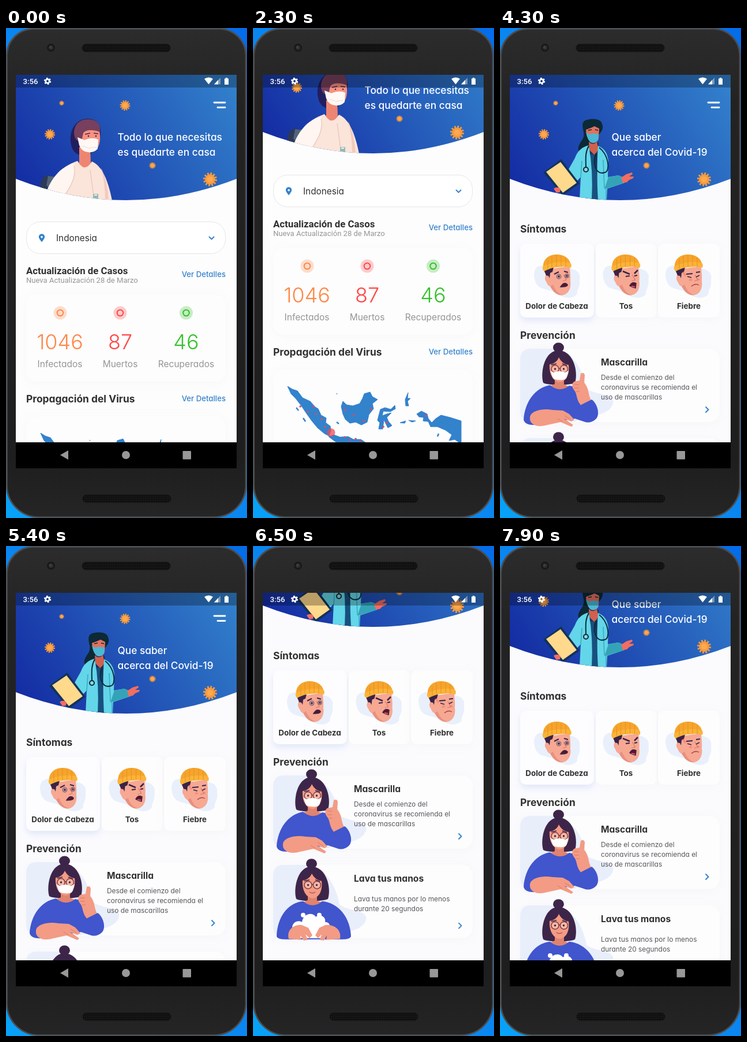
Write an HTML page that moves like this. It is 418 px wide and 848 px high and loops after 8000 ms.

```html
<!DOCTYPE html>
<html lang="es">
<head>
<meta charset="utf-8">
<title>App de salud</title>
<style>
html, body { margin: 0; width: 100%; height: 100%; overflow: hidden; background: #0a7cf0; }
svg { display: block; }
text { font-family: Inter, "Open Sans", sans-serif; font-feature-settings: "cv11"; fill: #303030; }
.rob, .rob text { font-family: Roboto, sans-serif; }
.lead { font-size: 17.3px; font-weight: 500; fill: #fff; }
.h { font-size: 17.4px; font-weight: 700; }
.link { font-size: 13.2px; font-weight: 500; fill: #3382cc; text-anchor: end; }
.num { font-size: 36px; font-weight: 300; text-anchor: middle; }
.cap { font-size: 15.5px; fill: #959595; text-anchor: middle; }
.sym { font-size: 13.4px; font-weight: 700; text-anchor: middle; }
.item { font-size: 15.6px; font-weight: 700; }
.body { font-size: 11.9px; fill: #58585c; }
.card { fill: #fdfdfe; filter: drop-shadow(0 2px 8px rgba(150, 150, 160, .06)); }
.active { fill: #fdfdff; filter: drop-shadow(0 6px 6px rgba(64, 110, 210, .13)); }
.chev { fill: none; stroke: #3382cc; stroke-width: 1.9; stroke-linecap: round; stroke-linejoin: round; }

.scroll1 { animation: scroll1 8s infinite step-end; }
.scroll2 { animation: scroll2 8s infinite step-end; }
.page2 { animation: enter 8s infinite step-end; }

@keyframes scroll1 {
  0% { transform: translateY(0); }
  15% { transform: translateY(0); animation-timing-function: steps(7, start); }
  23.75% { transform: translateY(-121px); }
  26.25% { transform: translateY(-121px); animation-timing-function: steps(3, start); }
  30% { transform: translateY(-81px); animation-timing-function: steps(5, start); }
  36.25%, 100% { transform: translateY(0); }
}
@keyframes enter {
  0% { opacity: 0; transform: translateY(0); }
  50% { opacity: .06; transform: translateY(148px); }
  51.25% { opacity: .34; transform: translateY(34px); }
  52.5% { opacity: .8; transform: translateY(3px); }
  53.75%, 100% { opacity: 1; transform: translateY(0); }
}
@keyframes scroll2 {
  0% { transform: translateY(0); }
  67.5% { transform: translateY(-8px); }
  68.75% { transform: translateY(-8px); animation-timing-function: steps(5, start); }
  75% { transform: translateY(-82px); animation-timing-function: steps(6, start); }
  82.5% { transform: translateY(-158px); animation-timing-function: steps(3, start); }
  86.25% { transform: translateY(-179px); }
  95% { transform: translateY(-179px); animation-timing-function: steps(4, start); }
  100% { transform: translateY(-88px); }
}
</style>
</head>
<body>
<svg width="100%" height="100%" viewBox="0 0 418 848">
<defs>
  <linearGradient id="desk" x1="0" y1="1" x2="1" y2="0"><stop stop-color="#08a2f8"/><stop offset=".5" stop-color="#0a86f0"/><stop offset="1" stop-color="#046cea"/></linearGradient>
  <linearGradient id="shell" x2="0" y2="1"><stop stop-color="#2d2c2c"/><stop offset=".15" stop-color="#232323"/><stop offset=".88" stop-color="#1e1e1e"/><stop offset="1" stop-color="#252525"/></linearGradient>
  <linearGradient id="sky" gradientUnits="userSpaceOnUse" x1="400" y1="81" x2="17" y2="334"><stop stop-color="#3383cd"/><stop offset="1" stop-color="#11249f"/></linearGradient>
  <pattern id="mesh" width="3" height="3" patternUnits="userSpaceOnUse"><rect width="3" height="3" fill="#0d0d0d"/><circle cx="1.5" cy="1.5" r=".8" fill="#2c2c2c"/></pattern>
  <clipPath id="curve"><path d="M17 81H400V261Q208.5 335 17 261Z"/></clipPath>

  <g id="virus">
    <circle r="7.4" fill="#f79a3e"/>
    <circle r="8" fill="none" stroke="#f79a3e" stroke-width="4" stroke-dasharray="2.2 1.99"/>
    <circle r="4.4" fill="#ffa94f"/>
  </g>
  <g id="hero">
    <path d="M17 81H400V261Q208.5 335 17 261Z" fill="url(#sky)"/>
    <use href="#virus" transform="translate(96.5 130) scale(.42)"/>
    <use href="#virus" transform="translate(206.5 134) scale(.9)"/>
    <use href="#virus" transform="translate(76 184) scale(.9)"/>
    <use href="#virus" transform="translate(254 238) scale(.56)"/>
    <use href="#virus" transform="translate(354 262) scale(1.2)"/>
    <path d="M361 129H380M367 137.5H380" stroke="#fff" stroke-width="2.8" stroke-linecap="round"/>
  </g>

  <g id="count">
    <circle r="11.5" opacity=".27" stroke="none" fill="currentColor"/>
    <circle r="5.3" fill="none" stroke="currentColor" stroke-width="2"/>
  </g>

  <g id="head">
    <path d="M64 406C78 398 90 406 104 410C124 404 142 412 138 428C140 440 132 446 134 452C124 464 108 458 98 452C88 444 78 446 68 440C58 432 56 412 64 406Z" fill="#e9f0fb"/>
    <path d="M80 410L121 404C121 412 123 420 122 430C124 442 119 452 110 454C99 456 92 448 87 439C80 438 77 422 80 410Z" fill="#f6a892"/>
    <path d="M87 439C92 448 99 456 110 454C101 453 95 444 92 436Z" fill="#e9907e"/>
    <path d="M76 411L93 406L91 414L87 416L86 425L81 422Z" fill="#3a2346"/>
    <path d="M84 421C77 418 76 427 81 432C84 434 87 431 86 425Z" fill="#f6a892"/>
    <path d="M75 408C73 391 86 384 98 384C112 384 122 391 123 404Z" fill="#f6a42c"/>
    <path d="M74 405C89 397 108 395 122 399Q125 401 123 407C108 403 92 405 77 413Q73 411 74 405Z" fill="#fbb338"/>
    <path d="M83 392V409M90 387V406M98 385V405M106 386V404M114 389V405" stroke="#e3921f" stroke-width="1"/>
    <path d="M110 419L115 428L109 430" fill="none" stroke="#e0776c" stroke-width="1.3"/>
  </g>

  <g id="face">
    <path d="M35 566Q35 547 54 547H100C130 556 146 590 150 616C166 628 200 624 196 642C190 664 150 664 130 673H54Q35 673 35 654Z" fill="#e9eefb"/>
    <ellipse cx="101.500" cy="545" rx="9.500" ry="8.500" fill="#3d2549"/>
    <path d="M75 606C70 592 75 551 101 550C128 550 136 588 130 606C120 611 84 611 75 606Z" fill="#3d2549"/>
    <path d="M95 595H111V609L119 612Q104 625 88 611L95 608Z" fill="#e0836f"/>
    <path d="M86 574C93 574 100 568 102 562C106 570 112 574 119 575C121 590 116 604 103 605C91 603 85 590 86 574Z" fill="#f39b84"/>
    <path d="M89 575L98 573M108 573L116 576" stroke="#3d2549" stroke-width="1.6"/>
    <path d="M89 582a6.500 6.500 0 1 0 13 0a6.500 6.500 0 1 0-13 0M104.500 582a6.500 6.500 0 1 0 13 0a6.500 6.500 0 1 0-13 0M101 581h4" fill="#f6b8a4" stroke="#7b3b45" stroke-width="1.4"/>
    <circle cx="95.500" cy="582" r="1.700" fill="#3d2549"/><circle cx="110.500" cy="582" r="1.700" fill="#3d2549"/>
  </g>
</defs>

<rect width="418" height="848" fill="url(#desk)"/>
<path d="M1.5 47A46 46 0 0 1 47 1.5H371A46 46 0 0 1 416 47V792A55 55 0 0 1 361 846.500H56A55 55 0 0 1 1.500 792Z" fill="url(#shell)" stroke="#504b48" stroke-width="2.600"/>
<circle cx="78" cy="34" r="7" fill="#191919"/><circle cx="78" cy="34" r="3.8" fill="#303036"/><circle cx="77" cy="33" r="1.5" fill="#45454d"/>
<rect x="132" y="28" width="153" height="13" rx="6.5" fill="url(#mesh)" stroke="#111"/>
<rect x="133" y="808" width="153" height="13" rx="6.5" fill="url(#mesh)" stroke="#111"/>
<rect x="17" y="81" width="383" height="681"/>
<g fill="#989898">
  <path d="M94 739L108 731V747Z"/><circle cx="208" cy="739" r="7"/><rect x="306.5" y="732" width="14.5" height="14.5" rx="1"/>
</g>

<svg x="17" y="81" width="383" height="636" viewBox="17 81 383 636">
  <rect x="17" y="81" width="383" height="636" fill="#fdfdfd"/>
  <g class="scroll1">
    <use href="#hero"/>
    <g clip-path="url(#curve)">
      <path d="M61 298C57 272 60 257 72 255L96 260V298Z" fill="#2c3a57"/>
      <path d="M73 256L88 258L80 285L70 272Z" fill="#52647a"/>
      <path d="M113 202C108 181 119 157 142 157C161 157 167 172 163 190L150 215C139 226 116 222 113 202Z" fill="#211e60"/>
      <path d="M127 206H146L147 234L158 244L136 250L118 240L127 232Z" fill="#ee8572"/>
      <path d="M128 183C132 172 150 174 162 177C165 194 162 211 150 214C136 215 126 200 128 183Z" fill="#f79280"/>
      <path d="M119 188C115 170 126 157 143 158C158 158 165 167 163 180C151 176 139 175 134 182L131 196C125 197 121 194 119 188Z" fill="#76405e"/>
      <path d="M137 184L146 182M152 182L160 183" stroke="#4b2850" stroke-width="1.5"/>
      <circle cx="143" cy="187" r="1.3" fill="#3b2350"/><circle cx="156" cy="187" r="1.3" fill="#3b2350"/>
      <path d="M124 189L136 194Q150 188 160 193L159 209Q153 216 143 215Q131 214 127 203Z" fill="#fff8f5"/>
      <path d="M132 204L144 208L157 206" fill="none" stroke="#edd9d6"/>
      <path d="M68 298C75 262 93 241 124 230Q136 252 149 231C168 239 178 268 184 298Z" fill="#fbe4d9"/>
      <path d="M68 290C76 262 96 238 118 235C125 252 111 278 95 298H68Z" fill="#fff6f2"/>
      <path d="M118 238C123 256 112 276 97 296M146 246L153 298" fill="none" stroke="#ebc8bc" stroke-width="1.4"/>
      <path d="M151 287H160V298H151Z" fill="#93b9b4"/><path d="M153 289H158" stroke="#eef7f4" stroke-width="2"/>
      <path d="M165 242Q176 266 178 298H172Q172 268 165 242Z" fill="#f4cabd"/>
    </g>
    <text class="lead" x="193.5" y="195">Todo lo que necesitas</text>
    <text class="lead" x="193.5" y="221">es quedarte en casa</text>

    <rect x="35.5" y="335.5" width="345" height="55" rx="24" fill="#fff" stroke="#e5e5e5"/>
    <path d="M62 370.5C58.5 366 56.8 363.5 56.8 361.5A5.2 5.2 0 0 1 67.2 361.5C67.2 363.5 65.5 366 62 370.5ZM62 359.8a1.8 1.8 0 1 0 .01 0Z" fill="#3382cc"/>
    <text x="87" y="368.5" font-size="15.3">Indonesia</text>
    <path class="chev" d="M352.5 361.5L356.5 365.5L360.5 361.5"/>

    <g class="rob">
      <text x="35" y="425.5" font-size="16.8" font-weight="700">Actualización de Casos</text>
      <text x="35" y="441" font-size="13.05" style="fill:#959595">Nueva Actualización 28 de Marzo</text>
    </g>
    <text class="link" x="381" y="431">Ver Detalles</text>

    <rect class="card" x="35" y="461" width="346" height="151" rx="18"/>
    <g color="#ff8748"><use href="#count" x="94" y="493"/><text class="num" x="93.5" y="555.5" style="fill:#ff8748">1046</text></g>
    <g color="#ff4848"><use href="#count" x="198" y="493"/><text class="num" x="198" y="555.5" style="fill:#ff4848">87</text></g>
    <g color="#36c12c"><use href="#count" x="312.5" y="493"/><text class="num" x="312.5" y="555.5" style="fill:#36c12c">46</text></g>
    <text class="cap" x="93.5" y="586.5">Infectados</text>
    <text class="cap" x="198" y="586.5">Muertos</text>
    <text class="cap" x="312.5" y="586.5">Recuperados</text>

    <text class="h" x="35" y="648">Propagación del Virus</text>
    <text class="link" x="381" y="646">Ver Detalles</text>
    <rect class="card" x="35" y="672" width="346" height="166" rx="18"/>
    <g transform="translate(0 81)">
      <g fill="#3382cc" stroke="#3382cc" stroke-linejoin="round">
        <path d="M60 620L68 625L77 628L86 640L99 646L108 656L113 659L118 670L127 675L126 683L134 689L135 697L132 706L124 702L112 692L102 680L92 666L84 654L74 641L66 633Z"/>
        <path d="M153 655L156 646L162 652L173 654L185 650L190 641L193 633L203 630L207 638L216 643L207 650L209 659L201 669L198 682L188 687L178 682L168 684L160 677L156 668Z"/>
        <path d="M131 707L140 704L151 708L165 707L174 712L187 712L196 718L204 721L200 725L180 722L160 719L143 716Z"/>
        <path d="M218 671L221 660L229 657L239 660L246 653L247 659L238 664L226 663L224 671L232 668L240 666L232 674L235 681L241 688L234 692L227 678L225 694L218 694L220 683L216 679Z"/>
        <path d="M265 654L264 643L269 631L268 641L273 641L268 646L270 654ZM255 683L265 680L263 684ZM270 679L282 680L276 682Z"/>
        <path d="M284 668L292 663L302 668L304 676L310 683L317 676L326 670L342 674L361 680V720L350 712L340 714L345 704L334 696L320 690L308 690L304 681L295 680L296 674L288 673Z"/>
        <path d="M207 721L216 719L232 723L248 721L245 725L228 726ZM256 732L272 723L266 731ZM230 733L242 735L238 738Z"/>
        <path d="M145 633h1M75 657l4 5M87 675l4 6M145 682l4 3M320 707l2-5" stroke-width="2.5"/>
      </g>
      <path d="M82 655h.1M95 664h.1M105 655h.1M109 668h.1M119 677h.1M125 690h.1M160 661h.1M175 669h.1M205 660h.1M192 680h.1M159 708h.1M168 713h.1M178 711h.1M186 715h.1M226 690h.1M232 683h.1M300 671h.1" stroke="#df4a62" stroke-width="3.6" stroke-linecap="round"/>
      <circle cx="135.5" cy="700" r="7" fill="#ef4b58" opacity=".75"/>
    </g>
  </g>

  <g class="page2">
    <rect x="17" y="81" width="383" height="636" fill="#fbfbfe"/>
    <g class="scroll2">
      <use href="#hero"/>
      <g clip-path="url(#curve)"><g transform="translate(0 8)">
        <path d="M154 190H171V202L181 290H145Z" fill="#12355e"/>
        <path d="M145 172C143 162 141 154 150 151C160 148 176 149 177 158C181 166 175 172 172 176L156 184C156 196 150 203 141 206C133 206 135 196 141 188C145 183 146 178 145 172Z" fill="#0c2935"/>
        <path d="M149 168Q158 165 164 162L172 166L171 184Q167 192 160 191Q151 188 149 168Z" fill="#e2705f"/>
        <path d="M153 169L159 168M165 168L170 169" stroke="#0c2935" stroke-width="1.4"/>
        <path d="M149 172L154 176Q162 173 171 176L170 186Q165 192 158 190Q152 187 149 172Z" fill="#4bb8d3"/>
        <path d="M154 189Q161 196 168 189L171 202L164 212L155 203Z" fill="#d2604f"/>
        <path d="M157 210L164 211L172 290H155Z" fill="#17507f"/>
        <path d="M154 195C142 198 134 205 130 217L112 249L126 265L140 250L138 290H159Q162 240 154 195Z" fill="#63d6e9"/>
        <path d="M170 196C181 200 187 209 188 223L187 250L205 247L215 251L216 260L186 270L185 290H170Q167 235 170 196Z" fill="#63d6e9"/>
        <path d="M188 250L206 247L215 251L216 260L181 271Z" fill="#35a3b7"/>
        <path d="M142 222L140 251M179 220L181 269M184 271V290" fill="none" stroke="#38a9bd" stroke-width="1.5"/>
        <path d="M154 196C147 208 149 220 149 234M172 199C188 211 192 239 182 242C170 246 162 235 164 217L166 209" fill="none" stroke="#102b3b" stroke-width="2"/>
        <circle cx="149" cy="237" r="4" fill="#8bd5de" stroke="#102b3b" stroke-width="2"/>
        <path d="M210 251L219 245L229 242L230 245L224 249L232 249L231 252L224 255L220 259L213 260Z" fill="#f16e61"/>
        <path d="M75 242L106 219L138 261L109 282Z" fill="#123259"/>
        <path d="M80 241L105 224L133 260L109 277Z" fill="#ffd98c"/>
        <path d="M93 270Q100 265 105 271L104 276L98 277Z" fill="#f16e61"/>
      </g></g>
      <text class="lead" x="193.5" y="195">Que saber</text>
      <text class="lead" x="193.5" y="221">acerca del Covid-19</text>

      <g transform="translate(0 8)">
        <text class="h" x="35" y="346">Síntomas</text>
        <rect class="active" x="35" y="365" width="128" height="128" rx="10"/>
        <rect class="card" x="166" y="365" width="106" height="128" rx="10"/>
        <rect class="card" x="274" y="365" width="107" height="128" rx="10"/>
        <use href="#head"/><use href="#head" x="119.5"/><use href="#head" x="228"/>
        <g fill="none" stroke="#3a2346" stroke-width="1.5">
          <path d="M94 418L102 414M111 413L118 415" stroke-width="2"/>
          <circle cx="102" cy="422" r="3.7" fill="#dcb0ac" stroke="#8a6670"/><circle cx="116" cy="421" r="3.2" fill="#dcb0ac" stroke="#8a6670"/>
          <circle cx="102" cy="422" r="1.2"/><circle cx="116" cy="421" r="1"/>
          <path d="M105 440Q111 430 117 436Q118 440 105 440Z" fill="#57172e"/>
          <path d="M213 413L225 418M233 417L239 411" stroke-width="2.6"/>
          <path d="M218 422L225 421M233 421L238 420" stroke-width="2"/>
          <path d="M225 438Q229 430 236 434L235 442Q229 441 225 438Z" fill="#57172e"/>
          <path d="M228 439L234 440" stroke="#ed5866" stroke-width="2"/>
          <path d="M323 418L334 417M340 415L347 414" stroke-width="1.8"/>
          <path d="M325 422L332 424M340 423L346 420" stroke-width="1.4"/>
          <path d="M332 439Q339 433 345 437" stroke="#a3434c"/>
          <path d="M317 414l5 7M328 428l5 0M342 428l4-1" stroke="#ee735f" stroke-width="3" opacity=".55"/>
        </g>
        <text class="sym" x="98.5" y="478">Dolor de Cabeza</text>
        <text class="sym" x="218.5" y="478">Tos</text>
        <text class="sym" x="327.5" y="478">Fiebre</text>

        <text class="h" x="35" y="530">Prevención</text>
        <rect class="card" x="35" y="547" width="346" height="127" rx="18"/>
        <use href="#face"/>
        <path d="M41 670C43 638 62 614 87 610Q103 624 120 611C134 613 146 620 151 627L169 654C171 668 160 677 148 674L130 668L70 678Q44 682 41 670Z" fill="#4155cd"/>
        <path d="M87 585L93 588Q103 584 113 588L119 585L115 598Q110 602 103 601Q95 601 92 598Z" fill="#fff"/>
        <path d="M128 618C123 611 125 603 133 603L138 602L140 590Q146 587 147 593L146 606C154 614 153 626 157 634L164 646L144 656L139 643C132 635 134 624 128 618Z" fill="#f39b84"/>
        <path d="M129 609h8M129 615h8M132 621h6" stroke="#d87967"/>
        <path d="M139 645L159 635C168 641 174 659 167 668C159 677 145 674 142 666Z" fill="#4155cd"/>
        <path d="M52 665C54 654 75 650 91 653L109 654L120 660L129 670L124 673L111 668L127 679L124 682L105 674L82 679C65 684 50 679 52 665Z" fill="#f39b84"/>
        <path d="M112 663l10 6M100 668l8 5" stroke="#d87967"/>
        <text class="item" x="175" y="576">Mascarilla</text>
        <text class="body" x="175" y="601">Desde el comienzo del</text>
        <text class="body" x="175" y="618">coronavirus se recomienda el</text>
        <text class="body" x="175" y="634.5">uso de mascarillas</text>
        <path class="chev" d="M357 648L361.5 652.5L357 657"/>

        <g transform="translate(0 154.7)">
          <rect class="card" x="35" y="547" width="346" height="127" rx="18"/>
          <use href="#face"/>
          <path d="M98 594Q103 598 108 594" fill="none" stroke="#a84652" stroke-width="1.3"/>
          <path d="M41 671C42 640 58 613 87 610Q103 624 120 610C150 613 169 640 170 671Q168 676 155 676H56Q43 676 41 671Z" fill="#4155cd"/>
          <path d="M68 656C68 646 78 642 85 646C87 631 103 628 109 637C118 631 127 638 125 646C133 646 136 654 131 660L120 674H81Z" fill="#fff"/>
          <circle cx="87" cy="634" r="4" fill="#fff"/><circle cx="115" cy="634" r="4" fill="#fff"/>
          <path d="M62 675C58 660 70 650 84 651L96 656L103 669L98 674L91 667L95 677L88 678L82 669L83 677ZM151 675C154 660 142 650 126 651L115 656L108 669L113 674L119 667L116 677L123 678L128 669L127 677Z" fill="#f39b84"/>
          <text class="item" x="175" y="576">Lava tus manos</text>
          <text class="body" x="175" y="610.5">Lava tus manos por lo menos</text>
          <text class="body" x="175" y="627.5">durante 20 segundos</text>
          <path class="chev" d="M357 648L361.5 652.5L357 657"/>
        </g>
      </g>
    </g>
  </g>

  <rect x="17" y="81" width="383" height="22" opacity=".27"/>
  <g fill="#fff">
    <text class="rob" x="29.5" y="97" font-size="13.2" font-weight="500" style="fill:#fff">3:56</text>
    <g fill="none" stroke="#fff">
      <circle cx="72" cy="92" r="3.3" stroke-width="2.7"/>
      <circle cx="72" cy="92" r="5.2" stroke-width="2" stroke-dasharray="2.6 2.845"/>
    </g>
    <path d="M344 88Q351.5 83 359 88L351.5 97.5Z"/>
    <path d="M372 86V97.5H361Z" opacity=".4"/><path d="M368 90V97.5H361Z"/>
    <path d="M379 87.5H381V86H384V87.5H386V98H379Z"/>
  </g>
</svg>
</svg>
</body>
</html>
```
